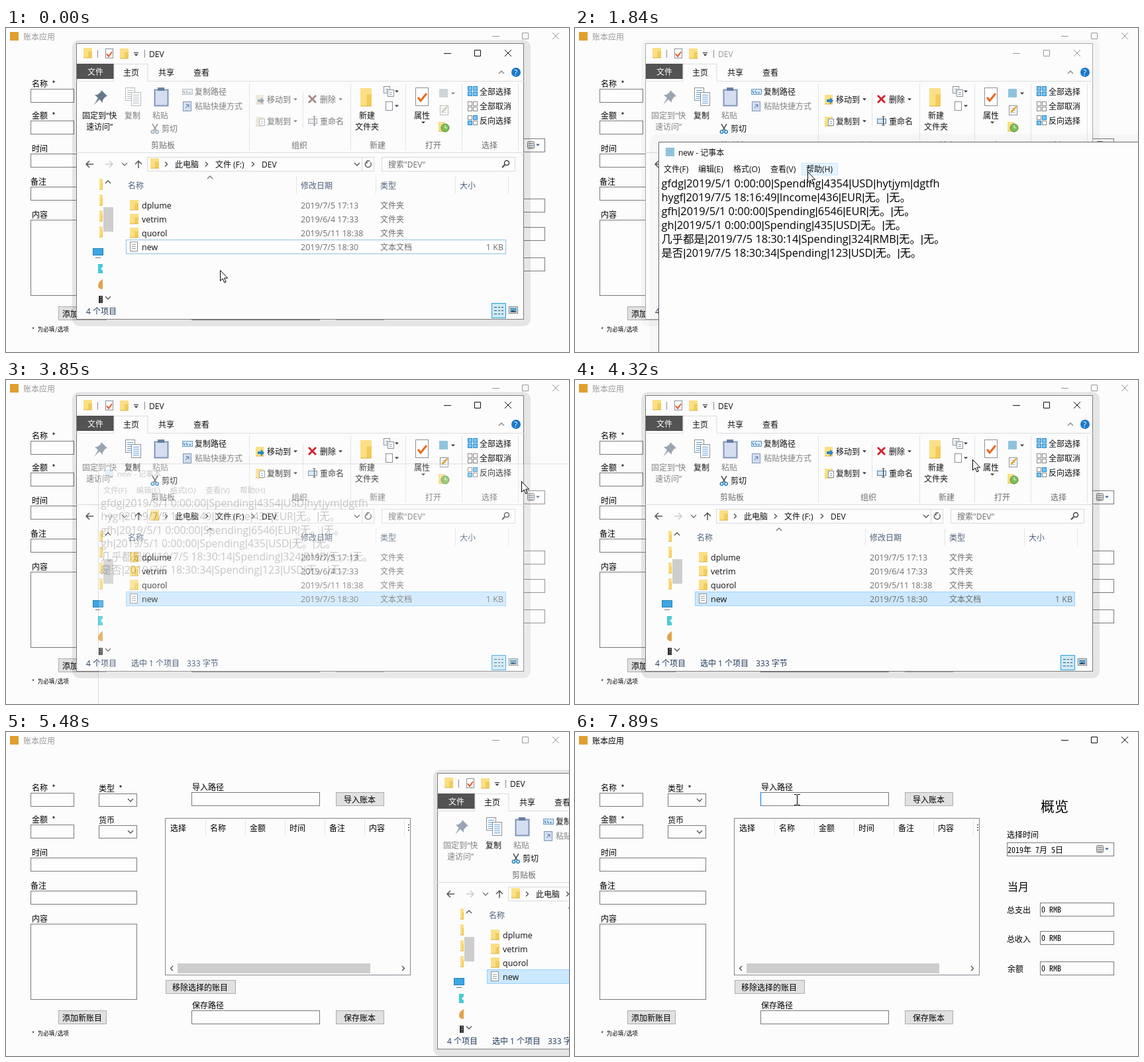
An HTML page for the animation above (8000 ms loop, 850 px wide and 490 px high).

```html
<!DOCTYPE html>
<html lang="zh-CN">
<head>
<meta charset="utf-8">
<style>
  html, body { margin: 0; width: 100%; height: 100%; overflow: hidden; background: #fcfcfc }
  svg { display: block }
  text { font: 12px "Open Sans", "Noto Sans CJK SC", sans-serif; fill: #111; white-space: pre }
  #app text { font-family: "Noto Sans Mono CJK SC", "Noto Sans CJK SC", monospace; fill: #000 }
  #app.idle .title { fill: #999 }
  #app.idle .ctl, #explorer.idle .ctl { stroke: #999 }
  #explorer.idle .title { fill: #999 }
  #explorer.idle .frame { stroke: #aaa }
  #explorer.idle .shade { opacity: .03 }
  #explorer .latin { font-size: 12.5px }
  #explorer .soft { fill: #6d6d6d }
  #explorer .head { fill: #4c607a }
  #explorer .status { fill: #1e395b }
  #explorer .off { fill: #838383 }
  #explorer .white { fill: #fff }
  #explorer.picked text.pin { fill: #838383 }
  #explorer.picked g.pin { opacity: .65 }
  #explorer:not(.picked) text.sel { fill: #777 }
  #explorer:not(.picked) g.sel { filter: grayscale(.75); opacity: .6 }
  #explorer:not(.picked) .status.sel { display: none }
  #explorer .row { fill: #fff; stroke: #8cc4dd }
  #explorer.picked .row { fill: #cce8ff; stroke: #99d1ff }
  #notepad .body { font-size: 16.35px; fill: #000 }
  #notepad .bar { font-family: "Liberation Sans", sans-serif }
  .ctl { fill: none; stroke: #111 }
  .shade { opacity: .09 }
</style>
</head>
<body>
<svg id="stage" width="850" height="490" viewBox="0 0 850 490"></svg>
<script>
const LOOP = 8000;

// Drawing helpers; text is placed by its vertical centre.
const text = (x, y, s, cls = '', attr = '') => `<text x="${x}" y="${y + 4.5}" class="${cls}" ${attr}>${s}</text>`;
const box = (x, y, w, h, fill = 'none', stroke = 'none', attr = '') => {
  const o = stroke === 'none' ? 0 : .5;
  return `<rect x="${x + o}" y="${y + o}" width="${w}" height="${h}" fill="${fill}" stroke="${stroke}" ${attr}/>`;
};
const path = (d, stroke = '#444', attr = '') => `<path d="${d}" fill="none" stroke="${stroke}" ${attr}/>`;
const shape = (d, fill, attr = '') => `<path d="${d}" fill="${fill}" ${attr}/>`;
const chevron = (x, y, dx, dy, c = '#555') => path(dx
  ? `M${x - 2 * dx} ${y - 3.5}l${3.5 * dx} 3.5l${-3.5 * dx} 3.5`
  : `M${x - 4} ${y - 2 * dy}l4 ${4 * dy}l4 ${-4 * dy}`, c, 'stroke-width="1.4"');
const drop = (x, y, c = '#333') => shape(`M${x - 3} ${y - 1.5}h6l-3 3z`, c);
const folder = (x, y, w = 13, h = 15) =>
  box(x, y, w, h, '#fbdf85') + box(x + w * .55, y + h * .35, w * .45, h * .65, '#f3cb5c') + path(`M${x} ${y + h}h${w}`, '#dcae3c');
const page = (x, y, w, h, lines = '#7d99b8', fill = '#fff') => {
  let rules = '';
  for (let i = 4; i < h - 2; i += 3) rules += `M${x + 3} ${y + i + .5}h${w - 5}`;
  return box(x, y, w, h, fill, '#8a8f98') + path(rules, lines);
};
const controls = (y, x1, x2, x3) =>
  `<path class="ctl" d="M${x1} ${y + .5}h11M${x2 + .5} ${y - 4.5}h9v9h-9zM${x3} ${y - 5}l10 10m0 -10l-10 10"/>`;
const group = (cls, s) => `<g class="${cls}">${s}</g>`;

function drawApp() {
  const fields = [[37, 92, 65, 20], [37, 140, 65, 20], [37, 190, 160, 20], [37, 240, 160, 20], [37, 290, 160, 114],
    [140, 93, 57, 19], [140, 141, 57, 19], [280, 91, 193, 20], [280, 421, 193, 20], [652, 167, 161, 20],
    [702, 258, 111, 20], [702, 301, 111, 20], [702, 347, 111, 20]];
  const labels = [[39, 84, '名称 *'], [140, 85, '类型 *'], [39, 132, '金额 *'], [140, 133, '货币'], [39, 182, '时间'],
    [37, 232, '备注'], [39, 282, '内容'], [281, 83, '导入路径'], [281, 413, '保存路径'], [652, 155, '选择时间'],
    [652, 269, '总支出'], [652, 313, '总收入'], [653, 358, '余额'], [653, 178, '2019年 7月 5日']];
  const buttons = [[498, 91, 72, '导入账本', 12], [241, 375, 105, '移除选择的账目', 10],
    [79, 421, 72, '添加新账目', 6], [498, 421, 72, '保存账本', 12]];
  const columns = ['选择', '名称', '金额', '时间', '备注', '内容'];
  return box(0, 0, 850, 490, '#fcfcfc') + box(6, 6, 13, 13, '#e0a030') +
    text(26, 13, '账本应用', 'title') + controls(12, 734, 779, 825) +
    fields.map(f => box(...f, '#fdfdfd', '#7a7a7a')).join('') +
    labels.map(l => text(...l)).join('') +
    buttons.map(([x, y, w, s, pad]) => box(x, y, w, 20, '#e1e1e1', '#adadad') + text(x + pad, y + 11, s)).join('') +
    [268, 311, 357].map(y => text(704, y, '0 RMB', '', 'font-weight="600"')).join('') +
    chevron(188, 103, 0, 1) + chevron(188, 151, 0, 1) +
    text(703, 115, '概览', '', 'style="font-size:21px;font-weight:300"') +
    text(653, 235, '当月', '', 'style="font-size:16px;font-weight:300"') +
    text(39, 454, '* 为必填/选项', '', 'style="font-size:8.6px"') +
    box(240, 130, 370, 237, '#fcfcfc', '#828790') +
    columns.map((s, i) => text(248 + i * 60, 145, s) + path(`M${301.5 + i * 60} 132v25`, '#e5e5e5')).join('') +
    path('M607 140.5h2m-2 4h2m-2 4h2', '#222') +
    box(259, 350, 291, 15, '#cdcdcd') + chevron(250, 357.5, -1, 0) + chevron(600, 357.5, 1, 0) +
    box(787, 171, 10, 11, '#ddd', '#777', 'rx="2"') + path('M789 174.5h7m-7 3h7m-7 3h7', '#777') + drop(803, 177, '#3b5f8c') +
    `<g id="focus">${path('M280.5 91v21', '#0078d7')}</g><g id="appCaret">${path('M283.5 94v12', '#000')}</g>`;
}

function drawRibbon() {
  const labels = [[115, 132, '固定到“快', 'pin'], [121, 149, '速访问”', 'pin'], [179, 132, '复制', 'sel'], [221, 132, '粘贴', 'off'],
    [285, 96, '复制路径', 'sel'], [285, 118, '粘贴快捷方式', 'off'], [235, 152, '剪切', 'sel'], [219, 177, '剪贴板', 'soft'],
    [394, 108, '移动到', 'sel'], [394, 141, '复制到', 'sel'], [474, 108, '删除', 'sel'], [474, 141, '重命名', 'sel'],
    [431, 177, '组织', 'soft'], [533, 132, '新建'], [527, 149, '文件夹'], [549, 177, '新建', 'soft'], [616, 132, '属性'],
    [633, 177, '打开', 'soft'], [715, 96, '全部选择'], [715, 118, '全部取消'], [715, 140, '反向选择'], [718, 177, '选择', 'soft']];
  const tiles = (y, fills) => fills.map((f, i) => box(697 + i % 2 * 8, y + (i >> 1) * 8, 6, 6, f, f === '#fff' ? '#888' : '#2687c5')).join('');
  const blue = '#79c4ef';
  return labels.map(l => text(...l)).join('') +
    path('M106 80.5h57V54.5h51v26h568M106 188.5h676', '#dadbdc') +
    path('M367.5 84v102M520.5 84v102M603.5 84v102M688.5 84v102M773.5 84v102M448.5 96v54', '#e2e3e4') +
    group('pin', shape('M144 94l9 9-3 1-4 5 0 4-5-5-8 8 6-10-5-5 4 0 5-4z', '#66778c')) +
    group('sel', page(180, 90, 14, 19, '#5b9bd5') + page(189, 97, 14, 20, '#5b9bd5') +
      box(266, 92, 15, 8, '#cfe6f7', '#6b9ec5') + path('M268 95l2 4m2-4l2 4m2-1h3', '#1d5c92') +
      path('M221 145l6 10m2-10l-6 10', '#555', 'stroke-width="1.5"') +
      '<g fill="none" stroke="#2687c5" stroke-width="1.6"><circle cx="221.5" cy="157" r="2.2"/><circle cx="228" cy="157" r="2.2"/></g>' +
      folder(377, 101, 12, 14) + shape('M380 108h5v-3l5 5-5 5v-3h-5z', '#2687c5') +
      folder(377, 134, 12, 14) + page(382, 137, 8, 10, '#5b9bd5') +
      path('M457 102l11 11m0-11l-11 11', '#d3202a', 'stroke-width="2.8"') +
      box(456, 137, 13, 7, '#cfe6f7', '#5d7f9e') + path('M465.5 134v13m-2-13h4m-4 13h4', '#333') +
      drop(437, 108) + drop(505, 108) + drop(437, 141) +
      box(654, 92, 13, 13, '#8fc3dc') + drop(675, 99) +
      page(655, 117, 12, 14, '#bbb') + path('M658 128l8-9', '#e2a32d', 'stroke-width="2.5"')) +
    folder(653, 142, 10, 14) + '<circle cx="663" cy="151" r="6" fill="#7fbe55" stroke="#4c8c2f"/>' + path('M663 147v4h3', '#fff') +
    box(224, 93, 20, 24, '#d4def0', '#7f95b8', 'stroke-width="2"') + box(229, 90, 10, 5, '#68809f') +
    box(267, 111, 12, 14, '#d4def0', '#7f95b8') + path('M271 121l5-5m-4 0h4v4', '#4a6fa5') +
    folder(535, 91, 17, 27) +
    page(570, 88, 9, 10) + page(576, 93, 9, 10) + drop(590, 96) + page(573, 111, 10, 13, '#fff') + drop(590, 118) +
    page(618, 90, 19, 27, '#fff') + path('M622 105l4 5 9-11', '#ea6a1f', 'stroke-width="3"') + drop(630, 143) +
    tiles(88, [blue, blue, blue, blue]) + tiles(111, ['#fff', '#fff', '#fff', '#fff']) + tiles(132, ['#fff', blue, blue, '#fff']);
}

function drawExplorer() {
  const files = [['dplume', '2019/7/5 17:13'], ['vetrim', '2019/6/4 17:33'], ['quorol', '2019/5/11 18:38'], ['new', '2019/7/5 18:30']];
  const rows = files.map(([name, date], i) => {
    const y = 268 + i * 21, last = i === 3;
    return (last ? page(187, y - 8, 11, 14, '#999') : folder(187, y - 8)) + text(205, y, name, 'latin') +
      text(445, y, date, 'latin soft') + text(565, y, last ? '文本文档' : '文件夹', 'soft');
  }).join('');
  return '<rect class="shade" x="100" y="18" width="692" height="433" rx="11"/>' +
    '<rect class="frame" x="106.5" y="23.5" width="675" height="417" fill="#fcfcfc" stroke="#7c7c7c"/>' +
    folder(117, 30) + path('M138.5 33v12M209.5 33v12', '#888') +
    page(150, 31, 11, 14, '#fff') + path('M152 39l3 4 5-7', '#e2552b', 'stroke-width="2"') +
    folder(172, 31) + path('M193 37.5h7', '#222') + drop(196.5, 41) +
    text(216, 39, 'DEV', 'title') + controls(38, 661, 707, 753) +
    box(107, 54, 56, 23, '#535353') + text(123, 66, '文件', 'white') +
    text(177, 67, '主页') + text(230, 67, '共享') + text(283, 67, '查看') +
    chevron(748, 67, 0, -1, '#888') + '<circle cx="770" cy="67" r="7" fill="#1979ca"/>' + text(767, 67, '?', 'white', 'font-weight="700"') +
    drawRibbon() +
    path('M132 206h-11m5-5l-5 5 5 5M200 212v-11m-5 5l5-5 5 5', '#555', 'stroke-width="1.5"') +
    path('M150 206h11m-5-5l5 5-5 5', '#ccc', 'stroke-width="1.5"') + chevron(179, 206, 0, 1, '#777') +
    box(213, 195, 342, 21, '#fdfdfd', '#d9d9d9') + path('M537.5 196v20', '#d9d9d9') + folder(218, 197) +
    [242, 303, 373].map(x => chevron(x, 206, 1, 0)).join('') +
    text(255, 206, '此电脑') + text(316, 206, '文件 (F:)') + text(386, 206, 'DEV') +
    chevron(530, 206, 0, 1) + path('M550 203a4.5 4.5 0 1 1-5-1m0 3v-4h4', '#555', 'stroke-width="1.3"') +
    box(567, 195, 201, 21, '#fdfdfd', '#d9d9d9') + text(577, 206, '搜索"DEV"', 'soft') +
    '<circle cx="756" cy="204" r="3.5" fill="none" stroke="#444" stroke-width="1.5"/>' + path('M753 207l-4 4', '#444', 'stroke-width="2"') +
    [228, 252, 276, 300].map(y => folder(141, y, 5, 16)).join('') +
    box(131, 333, 15, 10, '#3ba7e5', '#2d7eae') + path('M135 347.5h8', '#777') +
    shape('M139 357h7v4l-3 3 3 3v4h-7z', '#45cbd8') + shape('M146 380q-7 4-7 10 0 5 7 5z', '#e2a24e') +
    box(140, 405, 6, 11, '#333') + path('M143.5 406v9', '#bcd', 'stroke-dasharray="2 2"') +
    chevron(154, 233, 0, -1) + box(147, 271, 15, 37, '#cdcdcd') + chevron(154, 408, 0, 1) +
    text(184, 238, '名称', 'head') + text(445, 238, '修改日期', 'head') + text(565, 238, '类型', 'head') + text(685, 238, '大小', 'head') +
    chevron(308, 226, 0, -1, '#777') + path('M438.5 224v27M558.5 224v27M678.5 224v27M758.5 224v27', '#e5e5e5') +
    '<rect class="row" x="181.5" y="320.5" width="573" height="21"/>' + rows + text(751, 331, '1 KB', 'latin soft', 'text-anchor="end"') +
    text(121, 428, '4 个项目', 'status') + text(189, 428, '选中 1 个项目', 'status sel') + text(273, 428, '333 字节', 'status sel') +
    box(733, 416, 21, 22, '#cbe8f6', '#26a0da') + path('M737 422.5h4m2 0h3m2 0h3m-14 5h4m2 0h3m2 0h3m-14 5h4m2 0h3m2 0h3', '#456') +
    box(759, 421, 13, 10, '#fff', '#777') + box(761, 423, 10, 7, '#5f9fc8') + shape('M761 430l4-3 6 3z', '#345');
}

function drawNotepad() {
  const lines = ['gfdg|2019/5/1 0:00:00|Spending|4354|USD|hytjym|dgtfh', 'hygf|2019/7/5 18:16:49|Income|436|EUR|无。|无。',
    'gfh|2019/5/1 0:00:00|Spending|6546|EUR|无。|无。', 'gh|2019/5/1 0:00:00|Spending|435|USD|无。|无。',
    '几乎都是|2019/7/5 18:30:14|Spending|324|RMB|无。|无。', '是否|2019/7/5 18:30:34|Spending|123|USD|无。|无。'];
  const menu = [[7, '文件(F)'], [59, '编辑(E)'], [112, '格式(O)'], [168, '查看(V)'], [222, '帮助(H)']];
  return '<rect class="shade" x="-14" y="-13" width="934" height="651" rx="12" style="opacity:.025"/>' +
    box(-1, -1, 907, 625, '#fdfdfd', '#666') + box(10, 8, 13, 13, '#8fc3dc') + text(29, 15, 'new - 记事本') +
    `<g id="hover">${box(215, 31, 54, 18, '#e5f3ff', '#cce8ff')}</g>` +
    menu.map(([x, s]) => text(x, 40.5, s)).join('') +
    lines.map((s, i) => text(3.5, 63 + i * 21, s.replace(/\|/g, '<tspan class="bar">|</tspan>'), 'body')).join('') +
    `<g id="caret">${path('M3.5 51v21', '#000')}</g>`;
}

document.getElementById('stage').innerHTML =
  `<g id="app">${drawApp()}</g><g id="explorer">${drawExplorer()}</g><g id="notepad">${drawNotepad()}</g>
  <g id="pointer"><circle id="halo" cx="-1" r="12" fill="#fff566"/>
  <path id="arrow" d="M.5 .5v16l3.7-3.5 2.6 6 2.4-1-2.6-5.8h5z" fill="#fff" stroke="#000"/>
  <path id="beam" d="M-4 -7.5h3l1.5 1 1.5-1h3M.5 -7v15M-4 8.5h3l1.5-1 1.5 1h3" fill="none" stroke="#000"/></g>`;

const $ = Object.fromEntries([...document.querySelectorAll('[id]')].map(e => [e.id, e]));
const show = (el, on) => el.style.display = on ? '' : 'none';
const within = (t, a, b) => t >= a && t < b;
const clamp = v => Math.min(1, Math.max(0, v));
const smooth = p => p * p * (3 - 2 * p);

// Keys are [time, ...values].
function track(keys, t, ease = p => p) {
  const next = keys.findIndex(k => k[0] > t);
  if (next < 1) return keys[next ? keys.length - 1 : 0].slice(1);
  const a = keys[next - 1], b = keys[next], p = ease((t - a[0]) / (b[0] - a[0]));
  return a.slice(1).map((v, i) => v + (b[i + 1] - v) * p);
}

const pointerKeys = [[530, 323, 366], [900, 327, 333], [1690, 327, 333], [1840, 351, 217], [2000, 358, 184], [2100, 358, 184],
  [2530, 353, 126], [2740, 353, 126], [3010, 880, 132], [3770, 860, 130], [3850, 778, 153], [4320, 600, 120], [4450, 600, 120],
  [5050, 483, 37], [5180, 483, 37], [5250, 561, 39], [5480, 1027, 76], [6400, 900, 112], [6490, 822, 112], [7180, 335, 102]];
const notepadKeys = [[2100, 127, 173], [2530, 122, 115]];
const explorerKeys = [[5180, 0], [5250, 78], [5330, 240], [5480, 544], [5790, 762]];
const presses = [[1000, 1080], [1150, 1230], [2080, 2610], [5150, 5800], [7180, 7290]];

function render(t) {
  const [px, py] = track(pointerKeys, t, smooth);
  const [nx, ny] = track(notepadKeys, t, smooth);
  const [ex] = track(explorerKeys, t);

  $.app.classList.toggle('idle', t < 7220);
  show($.focus, t >= 7340);
  show($.appCaret, within(t, 7340, 7890));

  $.explorer.classList.toggle('idle', within(t, 1300, 3770));
  $.explorer.classList.toggle('picked', t >= 1000);
  $.explorer.setAttribute('transform', `translate(${Math.round(ex)} ${Math.round(39 * (ex / 544) ** 1.5)})`);

  const opening = clamp((t - 1270) / 190), closing = clamp((t - 3740) / 140);
  const open = opening > 0 && closing < 1;
  const scale = .9 + .1 * smooth(opening) - .05 * closing;
  show($.notepad, open);
  $.notepad.setAttribute('opacity', opening * (1 - closing));
  $.notepad.setAttribute('transform', `translate(${Math.round(nx) + 453} ${Math.round(ny) + 312}) scale(${scale}) translate(-453 -312)`);
  show($.hover, within(px - nx, 215, 270) && within(py - ny, 31, 50));
  show($.caret, within(t, 2460, 3010) || within(t, 3540, 3740));

  const typing = open && opening === 1 && py - ny > 52 || t > 6490 && px < 474;
  show($.beam, typing);
  show($.arrow, !typing);
  show($.halo, presses.some(([a, b]) => within(t, a, b)));
  $.pointer.setAttribute('transform', `translate(${Math.round(px)} ${Math.round(py)})`);
}

const start = performance.now();
(function tick() {
  render((performance.now() - start) % LOOP);
  requestAnimationFrame(tick);
})();
</script>
</body>
</html>
```
